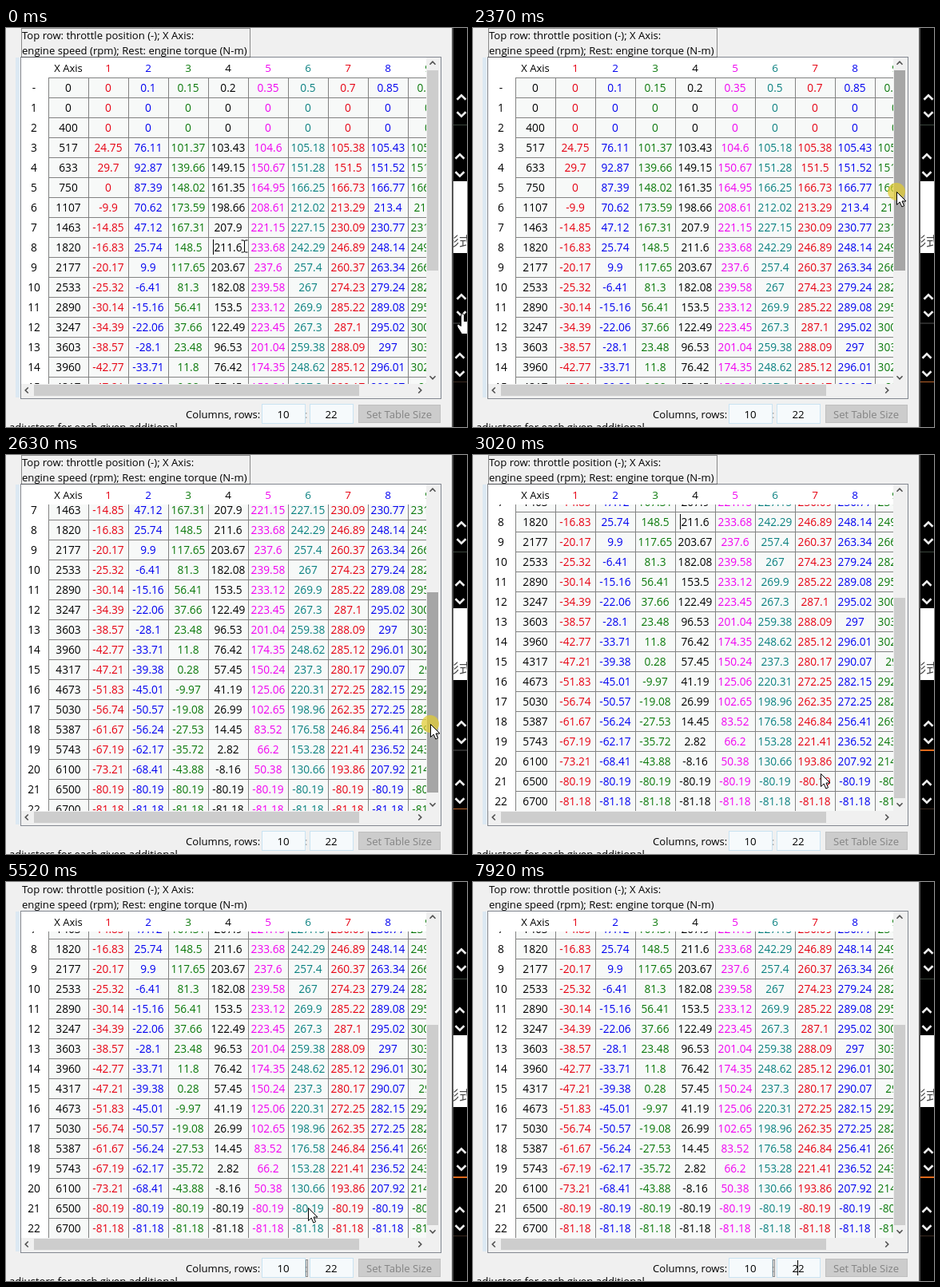
Animation of 577 by 500 pixels, one loop 8000 ms. Source, as an HTML page with a canvas:

```html
<!DOCTYPE html>
<html lang="en">
<head>
<meta charset="utf-8">
<title>Engine torque table</title>
<style>
html, body { margin: 0; height: 100%; overflow: hidden; background: #f0f0f0; }
canvas { display: block; }
</style>
</head>
<body>
<canvas id="stage" width="577" height="500"></canvas>
<script>
const ctx = document.getElementById('stage').getContext('2d');
const LOOP = 8000, TICK = 131.9;
const FONT = '"Open Sans", "Noto Sans", sans-serif';
const INK = ['#000', '#e60012', '#0000f0', '#0a780a', '#000', '#f000f0', '#0a8080', '#e60012', '#0000f0', '#0a780a'];

// Torque by throttle column, rows 3 to 20.
const torque = [
  '24.75 29.7 0 -9.9 -14.85 -16.83 -20.17 -25.32 -30.14 -34.39 -38.57 -42.77 -47.21 -51.83 -56.74 -61.67 -67.19 -73.21',
  '76.11 92.87 87.39 70.62 47.12 25.74 9.9 -6.41 -15.16 -22.06 -28.1 -33.71 -39.38 -45.01 -50.57 -56.24 -62.17 -68.41',
  '101.37 139.66 148.02 173.59 167.31 148.5 117.65 81.3 56.41 37.66 23.48 11.8 0.28 -9.97 -19.08 -27.53 -35.72 -43.88',
  '103.43 149.15 161.35 198.66 207.9 211.6 203.67 182.08 153.5 122.49 96.53 76.42 57.45 41.19 26.99 14.45 2.82 -8.16',
  '104.6 150.67 164.95 208.61 221.15 233.68 237.6 239.58 233.12 223.45 201.04 174.35 150.24 125.06 102.65 83.52 66.2 50.38',
  '105.18 151.28 166.25 212.02 227.15 242.29 257.4 267 269.9 267.3 259.38 248.62 237.3 220.31 198.96 176.58 153.28 130.66',
  '105.38 151.5 166.73 213.29 230.09 246.89 260.37 274.23 285.22 287.1 288.09 285.12 280.17 272.25 262.35 246.84 221.41 193.86',
  '105.43 151.52 166.77 213.4 230.77 248.14 263.34 279.24 289.08 295.02 297 296.01 290.07 282.15 272.25 256.41 236.52 207.92'
].map(s => s.split(' '));
const lastGain = [0, 0, 0, 0, 1, 1, 3, 3, 6, 5, 6.25, 6, 6.93, 10, 10, 13, 7, 7];
torque.push(torque[7].map((v, k) => +(+v + lastGain[k]).toFixed(2)));
const throttle = [0, 0, 0.1, 0.15, 0.2, 0.35, 0.5, 0.7, 0.85, 0.95];

function speed(row) {
  if (row < 3) return row === 2 ? 400 : 0;
  if (row > 20) return row === 21 ? 6500 : 6700;
  return Math.round(row < 5 ? 400 + (row - 2) * 350 / 3 : 750 + (row - 5) * 1070 / 3);
}
function cell(row, col) {
  if (row === 0) return throttle[col];
  if (col === 0) return speed(row);
  if (row < 3) return 0;
  return row > 20 ? (row === 21 ? '-80.19' : '-81.18') : torque[col - 1][row - 3];
}

// Pointer path: tick, x, y, shape.
const pointerPath = [
  [0, 571, 358, 'hand'], [3, 566, 318, 'hand'], [5, 555, 245, 'arrow'], [7, 548, 206, 'arrow'], [10, 548, 206, 'arrow'],
  [12, 563, 330, 'hand'], [13, 568, 418, 'hand'], [14, 562, 395, 'arrow'], [16, 536, 220, 'arrow'], [17, 530, 205, 'arrow'],
  [18, 530, 205, 'arrow'], [20, 531, 337, 'arrow'], [21, 531, 345, 'arrow'], [23, 339, 452, 'arrow'], [24, 338, 457, 'arrow'],
  [26, 350, 483, 'beam'], [27, 353, 490, 'beam'], [30, 353, 490, 'beam'], [31, 440, 488, 'arrow'], [32, 549, 480, 'arrow'],
  [34, 425, 484, 'beam'], [35, 413, 484, 'beam'], [38, 413, 484, 'beam'], [39, 408, 470, 'arrow'], [41, 378, 408, 'arrow'],
  [42, 369, 397, 'arrow'], [43, 315, 327, 'arrow'], [44, 287, 314, 'arrow'], [45, 300, 330, 'arrow'], [48, 476, 477, 'arrow'],
  [50, 440, 500, 'none'], [59, 281, 349, 'arrow'], [60, 281, 349, 'none']
];
const scrollPath = [[18, 0], [19, 84], [20, 181], [21, 191]];

function along(path, tick) {
  const n = path.findIndex(p => p[0] > tick);
  if (n === 0) return path[0];
  if (n < 0) return path[path.length - 1];
  const a = path[n - 1], b = path[n], f = (tick - a[0]) / (b[0] - a[0]);
  return a.map((v, k) => typeof v === 'number' ? v + (b[k] - v) * f : v);
}

function rect(x, y, w, h, fill) {
  ctx.fillStyle = fill;
  ctx.fillRect(x, y, w, h);
}
function frame(x, y, w, h, color, dash = []) {
  ctx.setLineDash(dash);
  ctx.lineWidth = 1;
  ctx.strokeStyle = color;
  ctx.strokeRect(x + 0.5, y + 0.5, w - 1, h - 1);
  ctx.setLineDash([]);
}
function text(s, x, y, color = '#000', size = 13.1, align = 'left') {
  ctx.font = `${size}px ${FONT}`;
  ctx.textAlign = align;
  ctx.fillStyle = color;
  ctx.fillText(s, x, y);
}
function clipped(x, y, w, h, draw) {
  ctx.save();
  ctx.beginPath();
  ctx.rect(x, y, w, h);
  ctx.clip();
  draw();
  ctx.restore();
}
function chevron(x, y, angle, r, color, width) {
  ctx.save();
  ctx.translate(x, y);
  ctx.rotate(angle);
  ctx.beginPath();
  ctx.moveTo(-r, r / 2);
  ctx.lineTo(0, -r / 2);
  ctx.lineTo(r, r / 2);
  ctx.strokeStyle = color;
  ctx.lineWidth = width;
  ctx.stroke();
  ctx.restore();
}

function drawTable(scroll, caret) {
  rect(12, 37, 5, 426, '#dce9f3');
  rect(18, 36, 527, 429, '#fff');
  clipped(19, 37, 507, 25, () => {
    text('X Axis', 78, 55, '#000', 13.1, 'center');
    for (let c = 1; c < 10; c++) text(c, 78 + 50 * c, 55, INK[c], 13.5, 'center');
  });
  clipped(19, 62, 507, 384, () => {
    rect(53, 62, 473, 384, '#f7f9f8');
    for (let r = 0; r < 23; r++) {
      const y = 62 + 25 * r - Math.round(scroll);
      rect(53, y, 473, 1, '#828282');
      text(r || '-', 35, y + 18, '#000', 13.7, 'center');
      for (let c = 0; c < 10; c++) text(cell(r, c), 78 + 50 * c, y + 18, INK[c], 13.7, 'center');
    }
    for (let x = 53; x < 526; x += 50) rect(x, 62, 1, 384, '#828282');
    if (caret) rect(259, 265 - Math.round(scroll), 1, 19, '#000');
  });
}

function drawScrollbars(scroll, hoverV, hoverH) {
  const thumb = hover => hover ? '#a6a6a6' : '#cdcdcd';
  rect(526, 37, 18, 427, '#f0f0f0');
  rect(19, 446, 525, 18, '#f0f0f0');
  rect(527, 53 + Math.round(scroll * 126 / 191), 14, 251, thumb(hoverV));
  rect(35, 447, 407, 14, thumb(hoverH));
  chevron(534, 44, 0, 3.5, '#505050', 1.6);
  chevron(534, 438, Math.PI, 3.5, '#505050', 1.6);
  chevron(26, 454, -Math.PI / 2, 3.5, '#505050', 1.6);
  chevron(518, 454, Math.PI / 2, 3.5, '#505050', 1.6);
  frame(18, 36, 527, 429, '#828790');
}

function drawForm(tick) {
  text('Top row: throttle position (-); X Axis:', 20, 14);
  text('engine speed (rpm); Rest: engine torque (N-m)', 20, 33);
  text('Columns, rows:', 225, 489);
  text(':', 374, 489, '#999');
  for (const [x, value] of [[320, '10'], [380, '22']]) {
    rect(x, 471, 55, 25, '#f6fafc');
    frame(x, 471, 55, 25, '#c9e3f2');
    text(value, x + 27, 489, '#000', 13.3, 'center');
  }
  rect(441, 472, 103, 23, '#cccccc');
  frame(441, 472, 103, 23, '#bfbfbf');
  text('Set Table Size', 492, 489, '#838383', 13.1, 'center');
  text('adjustors for each given additional', 4, 505);
  if (tick < 28) frame(19, 0, 287, 37, '#222', [1, 1]);
  else if (tick < 36) frame(210, 472, 114, 24, '#222', [1, 1]);
  else frame(375, 473, 3, 22, '#222', [1, 1]);
  if (tick >= 28 && (tick >> 2) % 2) rect(tick < 36 ? 346 : 406, 474, 1, 19, '#000');
}

function drawSidebar(tick) {
  rect(558, 0, 2, 500, '#555');
  rect(560, 0, 17, 500, '#000');
  rect(560, 192, 17, 90, '#fff');
  clipped(560, 192, 17, 90, () => {
    ctx.font = '16px "Noto Sans CJK SC", "Noto Sans CJK JP", sans-serif';
    ctx.textAlign = 'left';
    ctx.fillStyle = '#444';
    ctx.fillText('形式', 551, 273);
  });
  for (const top of [87, 337]) {
    chevron(570, top, 0, 5.5, '#eee', 2.6);
    chevron(570, top + 21, Math.PI, 5.5, '#eee', 2.6);
    chevron(568, top + 74, 0, 5.5, '#eee', 2.6);
    chevron(568, top + 96, Math.PI, 5.5, '#eee', 2.6);
  }
  rect(560, 121, 17, 1, '#39443b');
  rect(560, 369, 17, 2, tick >= 22 ? '#e06a1c' : '#292929');
  rect(560, 443, 17, 1, tick >= 13 && tick < 22 ? '#b8622a' : '#3a2a20');
}

const shapes = {
  arrow: new Path2D('M0 0V16L3.7 12.5L6.3 18.5L9 17.3L6.5 11.5H11.5Z'),
  hand: new Path2D('M-2 1Q0-2 2 1V9L5 9L9 11V18L6 25H-1L-6 17Q-8 13-5 13L-2 15Z'),
  beam: new Path2D('M-4-7.5H-1L0-6.5L1-7.5H4M0-6.5V6.5M-4 7.5H-1L0 6.5L1 7.5H4')
};
function drawPointer(x, y, shape) {
  if (!shapes[shape]) return;
  ctx.save();
  ctx.translate(Math.round(x) + 0.5, Math.round(y) + 0.5);
  ctx.lineWidth = 1;
  ctx.strokeStyle = '#000';
  ctx.fillStyle = '#fff';
  if (shape !== 'beam') ctx.fill(shapes[shape]);
  ctx.stroke(shapes[shape]);
  ctx.restore();
}

function render(now) {
  const tick = Math.floor((now % LOOP + 12) / TICK);
  const [, x, y, shape] = along(pointerPath, tick);
  const scroll = along(scrollPath, tick)[1];
  const pressed = tick >= 18 && tick <= 21;

  rect(0, 0, 577, 500, '#f0f0f0');
  drawTable(scroll, tick < 28 && ((tick + 3) >> 2) % 2 === 0);
  drawScrollbars(scroll, tick >= 16 && tick <= 21, tick >= 23 && tick <= 24);
  drawForm(tick);
  drawSidebar(tick);
  if (pressed) {
    ctx.beginPath();
    ctx.arc(x, y, 11, 0, 2 * Math.PI);
    ctx.fillStyle = 'rgba(226, 204, 50, 0.72)';
    ctx.fill();
  }
  if (tick === 0) drawPointer(298, 273, 'beam');
  drawPointer(x, y, shape);
  requestAnimationFrame(render);
}
requestAnimationFrame(render);
</script>
</body>
</html>
```
